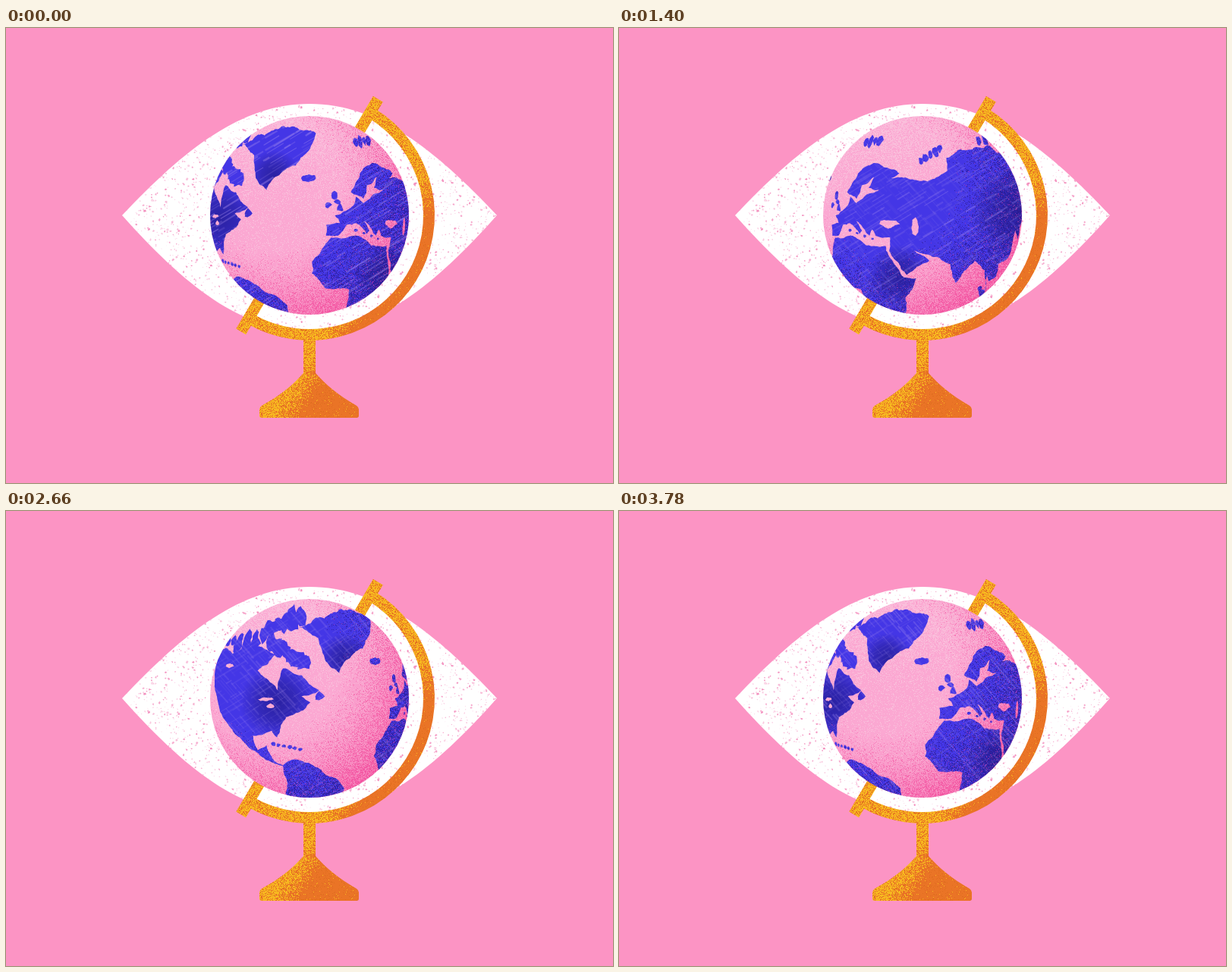
An HTML page with a canvas that plays this animation: 800 px wide and 600 px high, repeating every 3850 ms.

```html
<!DOCTYPE html>
<html>
<head>
<meta charset="utf-8">
<title>Globe eye</title>
<style>
html, body { margin: 0; width: 100%; height: 100%; overflow: hidden; background: #fc94c4; }
canvas { display: block; }
</style>
</head>
<body>
<canvas id="stage" width="800" height="600"></canvas>
<script>
const W = 800, H = 600, CX = 400, CY = 247, R = 131;
const STEP = 70, STEPS = 55, START_LON = -18.5;
const TAU = Math.PI * 2, RAD = Math.PI / 180;
const ctx = document.getElementById('stage').getContext('2d');

const clamp = (v, a = 0, b = 1) => Math.min(b, Math.max(a, v));
const mix = (a, b, k) => a + (b - a) * k;

function seeded(s) {
  return () => {
    s = (s + 0x6d2b79f5) | 0;
    let t = Math.imul(s ^ (s >>> 15), 1 | s);
    t = (t + Math.imul(t ^ (t >>> 7), 61 | t)) ^ t;
    return ((t ^ (t >>> 14)) >>> 0) / 4294967296;
  };
}

function layer(draw) {
  const c = document.createElement('canvas');
  c.width = W;
  c.height = H;
  if (draw) draw(c.getContext('2d'));
  return c;
}

// ---- Map: a few key points per continent, roughened by midpoint displacement.
const rnd = seeded(4);
const lands = [], seas = [];

// Height on the disc for a latitude, from -1 to 1.
function height(lat) {
  const d = lat - 48;
  return d * (0.0198 + 0.00011 * d + 1e-6 * d * d);
}

function rough(a, b, out) {
  const dx = b[0] - a[0], dy = b[1] - a[1];
  if (Math.hypot(dx, dy) < 1.5) return out.push(a);
  const k = (rnd() - 0.5) * 0.24;
  const m = [(a[0] + b[0]) / 2 - dy * k, (a[1] + b[1]) / 2 + dx * k * 0.7];
  rough(a, m, out);
  rough(m, b, out);
}

function coast(list, points) {
  const out = [];
  points.forEach((p, i) => rough(p, points[(i + 1) % points.length], out));
  list.push(out.map(([lon, lat]) => [lon, height(lat)]));
}

function blob(list, lon, lat, rx, ry = rx * 0.8) {
  const points = [];
  for (let a = 0; a < TAU; a += TAU / 8) {
    const k = 0.7 + rnd() * 0.6;
    points.push([lon + rx * k * Math.cos(a), lat + ry * k * Math.sin(a)]);
  }
  coast(list, points);
}

// A row of islands between two places.
function chain(lon, lat, lon2, lat2, n, r) {
  for (let i = 0; i < n; i++) {
    const k = i / (n - 1);
    blob(lands, mix(lon, lon2, k), mix(lat, lat2, k), r * (0.8 + rnd() * 0.5));
  }
}

const outline = text => coast(lands, text.split(',').map(p => p.trim().split(' ').map(Number)));

// North America, South America, Greenland, Africa, Eurasia
outline(`-132 70,-115 68,-94 71,-82 68,-93 61,-80 52,-77 62,-66 59,-56 52,-66 49,-61 46,-75 38,
  -81 26,-84 30,-97 27,-95 18,-88 21,-83 10,-78 8,-95 16,-112 29,-124 41,-132 56`);
outline('-79 8,-72 12,-62 10,-50 2,-35 -6,-36 -14,-80 -14');
outline('-70 78,-45 82.5,-14 81.5,-20 75,-27 70,-40 65,-44 60,-52 65,-56 74');
outline('-6 36,10 37,20 31.5,33 31,37 21,43 11.5,51 11,40 -15,13 -15,9 4,-8 4.5,-17 14,-17 21,-10 31');
outline(`-9 37,-9 43,-1 44,-4 48,8 54,9 57,14 54,29 60,22 61,25 65.5,17 62,14 56,6 59,13 67,26 71,41 67,
  36 65,70 68,70 73,104 77.5,130 72,180 69.5,190 66,163 60,162 56,157 51,156 58,143 59,136 55,141 50,129 42,
  127 35,122 40,120 33,118 24,108 20,109 12,103 9,100 13,103 2,97 16,88 22,77 8,72 20,57 26,48 30,56 25,59 22,
  45 13,35 28,36 36,27 37,25 40.5,23 37,14 45,18 40,16 38,9 44,3 43,-2 37`);

chain(-1, 51.8, -4, 57.5, 3, 2);       // Britain
blob(lands, -8, 53.3, 2);              // Ireland
blob(lands, -19, 65, 5, 1.6);          // Iceland
chain(14, 78.5, 25, 79.3, 4, 2);       // Svalbard
chain(54, 71.8, 66, 76.3, 5, 1.7);     // Novaya Zemlya
chain(96, 79, 102, 79.5, 2, 2.4);      // Severnaya Zemlya
chain(138, 75.4, 149, 75, 4, 1.5);     // New Siberian Islands
chain(143, 53, 143, 47, 4, 1.2);       // Sakhalin
chain(131, 33, 140, 36, 5, 1.4);       // Japan, south
chain(141, 38, 143, 43.2, 3, 1.5);     // Japan, north
chain(121, 17, 125, 7, 5, 1.6);        // Philippines
chain(97, 4, 106, -5, 5, 2.2);         // Sumatra
blob(lands, 114, 1, 4.5);              // Borneo
chain(121, 0, 148, -6, 8, 2);          // New Guinea
chain(-84, 22, -67, 18.5, 6, 1.3);     // Antilles
blob(lands, -56, 49, 2.6);             // Newfoundland
chain(-86, 72.5, -65, 64.5, 7, 3.4);   // Baffin
chain(-88, 77.5, -68, 81.5, 5, 4);     // Ellesmere
chain(-123, 73, -92, 75, 6, 2.6);      // Arctic isles
chain(-112, 71, -97, 72, 3, 3.4);      // Victoria
chain(9, 40, 25, 35.3, 4, 0.9);        // Mediterranean

blob(seas, 35, 43.5, 5.5, 2);
blob(seas, 51, 42, 2.3, 4.5);
blob(seas, -87, 47.5, 4, 1);
blob(seas, -84, 44, 3, 1.2);
blob(seas, -116, 63, 3.5, 1);

function place(lon, h, mid) {
  const rel = clamp(lon - mid, -90, 90) * RAD;
  return [CX + R * 1.02 * (1 - 0.28 * h * h) * Math.sin(rel), CY - R * h];
}

function fillShapes(g, list, mid) {
  for (const shape of list) {
    for (const turn of [-360, 0, 360]) {
      g.beginPath();
      for (const [lon, h] of shape) g.lineTo(...place(lon + turn, h, mid));
      g.fill();
    }
  }
}

// ---- Grain: paints every pixel of a box from a function returning [r, g, b, a].
function grain(g, x0, y0, w, h, pick) {
  const img = g.createImageData(w, h);
  for (let i = 0; i < w * h; i++) img.data.set(pick(x0 + i % w, y0 + Math.floor(i / w), rnd()), i * 4);
  g.putImageData(img, x0, y0);
}

const NONE = [0, 0, 0, 0];
const shade = (x, y) => clamp((Math.hypot(x - 350, y - 205) - 85) / 115) ** 1.3;
const globeBox = [CX - R - 1, CY - R - 1, 2 * R + 2, 2 * R + 2];

const ocean = layer(g => {
  const light = [251, 168, 210], pale = [250, 190, 219], hot = [242, 76, 156];
  grain(g, ...globeBox, (x, y, r) => {
    const p = shade(x, y);
    const rim = clamp((235 - y) / 120) * 0.5;
    const k = clamp(p * 0.55 + (r < p * 0.7 ? 0.4 : 0));
    const base = r > 0.86 - rim ? pale : light;
    return [...base.map((v, i) => mix(v, hot[i], k)), 255];
  });
});

const landGrain = layer(g => grain(g, ...globeBox, (x, y, r) => {
  const p = shade(x, y);
  if (r < p * 0.12) return [190, 55, 170, 150];
  if (r < p * 0.85) return [40, 24, 138, 165];
  return NONE;
}));

const backdrop = layer(g => {
  g.fillStyle = '#fc94c4';
  g.fillRect(0, 0, W, H);
  g.clip(new Path2D(`M153 247C235 160 310 100 400 100S565 160 647 247
    C565 339 490 400 400 400S235 339 153 247`));
  g.fillStyle = '#fff';
  g.fillRect(0, 0, W, H);
  for (let i = 0; i < 4200; i++) {
    const x = 150 + rnd() * 500, y = 98 + rnd() * 304, s = 0.5 + 1.3 * rnd() ** 2;
    g.fillStyle = `rgba(242,130,182,${0.3 + rnd() * 0.6})`;
    g.beginPath();
    for (let a = 0; a < TAU; a += TAU / 5) {
      const d = s * (0.4 + rnd());
      g.lineTo(x + d * Math.cos(a), y + d * Math.sin(a));
    }
    g.fill();
  }
});

const stand = layer(g => {
  const axis = -59.5 * RAD;
  g.strokeStyle = g.fillStyle = '#ea7426';
  g.lineWidth = 15;
  g.beginPath();
  g.arc(CX, CY, 157.5, axis + 0.02, axis + Math.PI - 0.02);
  g.stroke();
  for (const side of [1, -1]) {
    const c = Math.cos(axis) * side, s = Math.sin(axis) * side;
    g.beginPath();
    g.moveTo(CX + 128 * c, CY + 128 * s);
    g.lineTo(CX + 178 * c, CY + 178 * s);
    g.stroke();
  }
  g.fill(new Path2D(`M392 405V455C378 471 362 484 337 498Q334 500 334 503V511Q334 514 337 514
    H462Q465 514 465 511V503Q465 500 462 498C438 484 422 471 408 455V405Z`));
  const dots = layer(d => grain(d, 295, 80, 285, 440, (x, y, r) => {
    const p = Math.max((1135 - 1.6 * x - y) / 90, (145 - y) / 60, 0.02);
    if (r < clamp(p, 0, 0.65)) return [247, 184, 32, 255];
    return r > 0.9 ? [214, 104, 26, 150] : NONE;
  }));
  g.globalCompositeOperation = 'source-atop';
  g.drawImage(dots, 0, 0);
});

// ---- Land: flat blue, dark patches fixed to the map, grain and pencil lines.
const land = layer();
const lg = land.getContext('2d');

function patch(lon, lat, r, mid) {
  const rel = ((lon - mid + 540) % 360 + 360) % 360 - 180;
  if (Math.abs(rel) > 95) return;
  const [x, y] = place(rel, height(lat), 0);
  const glow = lg.createRadialGradient(x, y, 0, x, y, r);
  glow.addColorStop(0, 'rgba(34,26,140,.75)');
  glow.addColorStop(0.5, 'rgba(34,26,140,.5)');
  glow.addColorStop(1, 'rgba(34,26,140,0)');
  lg.fillStyle = glow;
  lg.fillRect(...globeBox);
}

function scratches(angle, seed, strength) {
  const r = seeded(seed);
  lg.save();
  lg.globalAlpha = strength;
  lg.translate(CX, CY);
  lg.rotate(angle);
  for (let y = -R; y < R; y += 2 + r() * 5) {
    lg.strokeStyle = `rgba(168,140,240,${0.1 + r() * 0.35})`;
    lg.lineWidth = 0.6 + r() * 1.9;
    lg.setLineDash([8 + r() * 45, 3 + r() * 30]);
    lg.lineDashOffset = r() * 90;
    lg.beginPath();
    lg.moveTo(-R, y);
    lg.quadraticCurveTo(0, y + r() * 8 - 4, R, y + r() * 10 - 5);
    lg.stroke();
  }
  lg.restore();
}

function drawLand(mid, step) {
  lg.globalCompositeOperation = 'source-over';
  lg.clearRect(0, 0, W, H);
  lg.fillStyle = '#4436e6';
  fillShapes(lg, lands, mid);
  lg.globalCompositeOperation = 'destination-out';
  fillShapes(lg, seas, mid);
  lg.globalCompositeOperation = 'source-atop';
  patch(-80, 46, 50, mid);
  patch(-40, 66, 34, mid);
  patch(130, 50, 66, mid);
  patch(40, 12, 42, mid);
  lg.drawImage(landGrain, 0, 0);
  // The two pencil directions trade places as the lines flicker.
  const sway = 0.5 + 0.5 * Math.cos(TAU * 17 * step / STEPS);
  scratches(-0.55, 100 + step, sway);
  scratches(0.85, 300 + step, 1 - sway);
}

// Slow start and end, fast middle: a cubic Bezier solved by bisection.
function ease(u) {
  let lo = 0, hi = 1, s = 0.5;
  for (let i = 0; i < 30; i++) {
    s = (lo + hi) / 2;
    const x = 3 * s * (1 - s) ** 2 * 0.63 + 3 * s * s * (1 - s) * 0.35 + s ** 3;
    if (x < u) lo = s; else hi = s;
  }
  return s * s * (3 - 2 * s);
}

function render(step) {
  drawLand(START_LON + 360 * ease(step / STEPS), step);
  ctx.drawImage(backdrop, 0, 0);
  ctx.drawImage(stand, 0, 0);
  ctx.save();
  ctx.beginPath();
  ctx.arc(CX, CY, R, 0, TAU);
  ctx.clip();
  ctx.drawImage(ocean, 0, 0);
  ctx.drawImage(land, 0, 0);
  ctx.restore();
}

let shown = 0;
const begin = performance.now();
render(0);

function tick() {
  const step = Math.floor((performance.now() - begin) / STEP) % STEPS;
  if (step !== shown) render(shown = step);
  requestAnimationFrame(tick);
}
requestAnimationFrame(tick);
</script>
</body>
</html>
```
